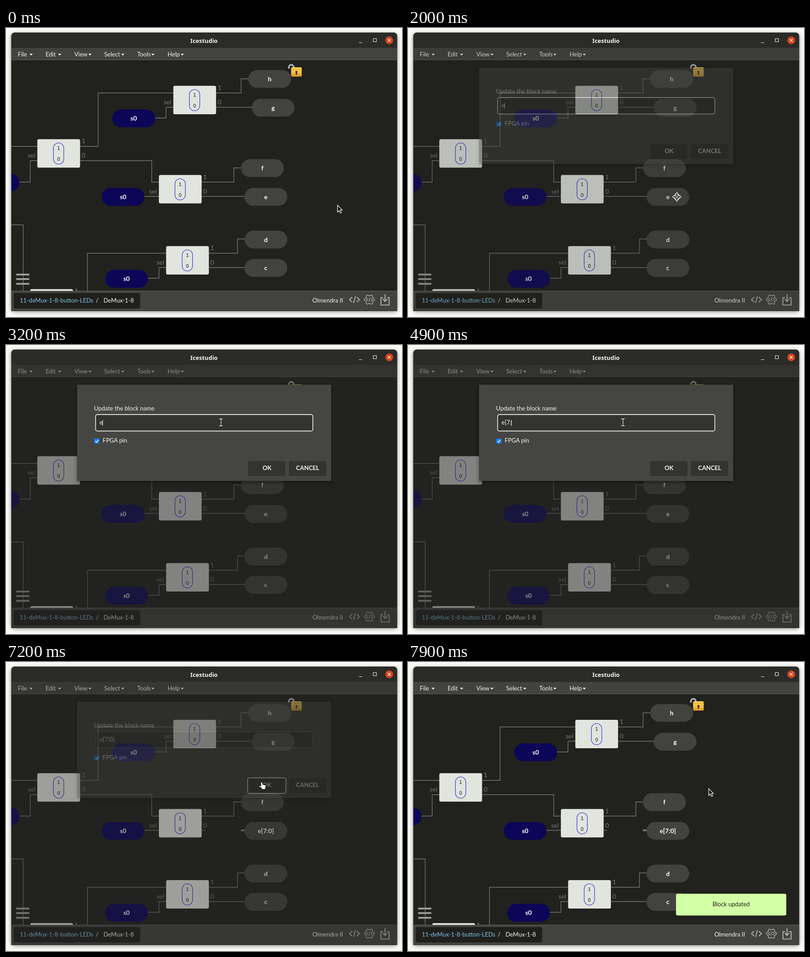
These frames come from a looping animation (875x640 px, 8000 ms). An HTML page:

```html
<!DOCTYPE html>
<html lang="en">
<head>
<meta charset="utf-8">
<title>Icestudio block rename</title>
<style>
  html, body { margin: 0; width: 100%; height: 100%; overflow: hidden; background: #fafaf7; }
  svg { display: block; width: 875px; height: 640px; }
  text { font: 13.1px Lato, sans-serif; fill: #f4f4f0; white-space: pre; }
  .bold { font-weight: bold; }
  .mid { text-anchor: middle; }
  .pill { font-size: 14px; font-weight: bold; text-anchor: middle; fill: #fff; }
  .port { font-size: 14px; fill: #7a7a76; }
  .mux { font: 11px "Liberation Sans", Arial, sans-serif; fill: #111; text-anchor: middle; }
  .wire { fill: none; stroke: #767672; stroke-width: 1.4; }
  .icon { fill: none; stroke: #aeaea9; stroke-width: 2; }
</style>
</head>
<body>
<svg viewBox="0 0 875 640">
  <defs>
    <filter id="shadow" x="-10%" y="-10%" width="120%" height="120%"><feGaussianBlur stdDeviation="4"/></filter>
    <clipPath id="canvasClip"><rect x="12" y="71" width="852" height="511"/></clipPath>
    <clipPath id="windowClip"><rect x="12" y="44" width="852" height="582.5"/></clipPath>
    <linearGradient id="gold" x2="0" y2="1"><stop stop-color="#ffd95a"/><stop offset="1" stop-color="#e9a52c"/></linearGradient>
  </defs>

  <rect x="11" y="12" width="854" height="617" rx="8" fill="#555" opacity=".6" filter="url(#shadow)"/>
  <path d="M11.5 627V18a8 8 0 0 1 8-8H856.500a8 8 0 0 1 8 8V627Z" fill="#2b2b28"/>
  <text class="bold mid" x="437.500" y="32.500" style="font-family:'Noto Sans',sans-serif;font-size:13px">Icestudio</text>
  <path d="M780 32.500h7M811.500 23.500h7v7h-7z" fill="none" stroke="#f2f2ee" stroke-width="1.100"/>
  <circle cx="846.800" cy="27.200" r="8.700" fill="#d2421a"/>
  <path d="M843.500 24l6.500 6.500m0-6.500l-6.500 6.500" stroke="#fff" stroke-width="1.300"/>

  <rect x="12" y="44" width="852" height="27" fill="#42423f"/>
  <rect x="12" y="71" width="852" height="511" fill="#21211d"/>
  <path d="M12 70.500H864" stroke="#62625e"/>
  <g id="menu"></g>

  <g clip-path="url(#canvasClip)">
    <g id="diagram"></g>
    <path id="wireOpen" class="wire" d="M432 372.800H527"/>
    <g id="wireCut"><path class="wire" d="M432 372.800h8"/><path d="M519 372.800h8" stroke="#767672" stroke-width="4"/></g>
    <g id="pills"></g>
    <rect id="selection" x="527" y="341.500" width="95.500" height="62.500" fill="#78aadc" opacity=".25"/>
    <path d="M625 90v-3a5.500 5.500 0 0 1 11 0v5" fill="none" stroke="#b3b8bb" stroke-width="3.400"/>
    <rect x="630" y="87" width="23.500" height="20.500" rx="2.500" fill="url(#gold)"/>
    <path d="M630 91h23.500M630 104h23.500" stroke="#c98a22"/>
    <path d="M641.700 95a2.300 2.300 0 0 1 1.200 4.300l.7 4h-3.800l.7-4a2.300 2.300 0 0 1 1.200-4.300" fill="#3d2c12"/>
    <path d="M22.500 546h29M22.500 556h29M22.500 566.500h29" stroke="#9c9c98" stroke-width="4.200"/>
  </g>

  <rect x="12" y="582" width="852" height="44.500" fill="#42423f"/>
  <path d="M12 582.500H864" stroke="#686864"/>
  <rect x="17" y="587" width="279.500" height="34" rx="4" fill="#1f1f1c"/>
  <text x="30.500" y="608" style="fill:#83c5e6">11-deMux-1-8-button-LEDs</text>
  <text x="198.500" y="608">/</text>
  <text x="215.500" y="608">DeMux-1-8</text>
  <text x="677" y="608">Olmendra II</text>
  <path class="icon" d="M765 596l-6 5.500 6 5.500M775 596l6 5.500-6 5.500M772 594l-4 15"/>
  <path class="icon" id="gear" style="stroke-width:1.500"/>
  <path class="icon" style="stroke-width:1.300" d="M800 598l-3.500 3.500 3.500 3.500M806 598l3.500 3.500-3.500 3.500M804 597l-2 9"/>
  <path class="icon" d="M833 597h-4.500v16.500h18V597H842M837.500 589.500v15M832.500 600l5 5.500 5-5.500" style="stroke-width:2.200"/>

  <rect id="dimmer" x="12" y="44" width="852" height="582.500" fill="#252525"/>

  <g id="dialog">
    <rect x="157" y="91" width="561" height="213" fill="#000" opacity=".45" filter="url(#shadow)"/>
    <rect x="157" y="88" width="561.500" height="213" fill="#454541"/>
    <text x="194.500" y="145">Update the block name</text>
    <rect id="field" fill="#333330"/>
    <text id="typed" x="206.800" y="176"></text>
    <rect id="caret" y="166" width="1" height="13" fill="#fff"/>
    <rect x="195" y="207" width="11.500" height="11.500" rx="2" fill="#1579f2"/>
    <path d="M197.500 212.800l2.500 2.700 4.300-5.500" fill="none" stroke="#fff" stroke-width="1.700"/>
    <text x="213.500" y="216">FPGA pin</text>
    <rect id="ok" x="535" y="257" width="82.500" height="33" rx="3" fill="#333330"/>
    <rect id="okRing" x="534" y="256.500" width="84.500" height="34.500" rx="4" fill="none" stroke="#e6e6e2" stroke-width="2"/>
    <rect x="625" y="257" width="82.500" height="33" rx="3" fill="#333330"/>
    <text class="bold mid" x="576.800" y="276.500">OK</text>
    <text class="bold mid" x="666.500" y="276.500">CANCEL</text>
  </g>

  <g clip-path="url(#windowClip)">
    <g id="toast">
      <rect x="592.500" y="513.500" width="243" height="47.500" rx="3" fill="#d3ffa6" stroke="#b5df8b"/>
      <text class="mid" x="714" y="541" style="fill:#20201c">Block updated</text>
    </g>
  </g>

  <g id="cursor">
    <path id="arrow" d="M.5.5V15.500L4 12.200l2.600 5.600 2.600-1.200-2.600-5.400H11Z" fill="#111" stroke="#fff" stroke-width="1.200"/>
    <g id="move" fill="#111" stroke="#fff" stroke-width="1.200">
      <path d="M0-9.500L3.500-5.500H1.500L5.500-1.500V-3.500L9.500 0 5.500 3.500V1.500L1.500 5.500H3.500L0 9.500-3.500 5.500H-1.500L-5.500 1.500V3.500L-9.500 0-5.500-3.500V-1.500L-1.500-5.500H-3.500Z"/>
      <circle r="2.200"/>
    </g>
    <g id="beam" fill="none">
      <path d="M-4-7.500h3L0-6.500 1-7.500h3M-4 8h3L0 7 1 8h3M0-6.500V7" stroke="#111" stroke-width="3"/>
      <path d="M-4-7.500h3L0-6.500 1-7.500h3M-4 8h3L0 7 1 8h3M0-6.500V7" stroke="#fff" stroke-width="1.300"/>
    </g>
    <path id="hand" d="M0 .5c1.200-.8 2.300 0 2.500 1.200L3 5.500l5.500 1c1.300.3 1.700 1.200 1.500 2.500L9 13v3H1.500v-2L-4.500 9.500c-.8-1.200.4-2.200 1.600-1.600L-.6 9-1 2C-1 1.200-.6.700 0 .5Z" fill="#fff" stroke="#111" stroke-width=".9"/>
  </g>
</svg>

<script>
const LOOP = 8000, STEP = 100;
const $ = id => document.getElementById(id);
const clamp = v => Math.max(0, Math.min(1, v));
const set = (id, attrs) => { for (const k in attrs) $(id).setAttribute(k, attrs[k]); };
const show = (id, on) => set(id, { visibility: on ? 'visible' : 'hidden' });

const menu = [['File', 26, 52], ['Edit', 87.5, 115], ['View', 151, 182], ['Select', 217, 254.500], ['Tools', 290, 321], ['Help', 357, 386]];
$('menu').innerHTML = menu.map(([name, x, caret]) =>
  `<text x="${x}" y="62.500">${name}</text><path d="M${caret} 57h7l-3.500 4z" fill="#f4f4f0"/>`).join('');

const wires = ['M464 143.700H519.500V112.500H536', 'M464 175.500H543', 'M329 199.200H353.500V175.500H370',
  'M164 262.200H203.500V143.700H370', 'M12 262.200H70', 'M29 341.200H53.500V293.700H70',
  'M164 293.700H322V341.200H338', 'M432 341.200H503.500V309.700H520', 'M306 372.800H338',
  'M180 582V498.700H354', 'M448 498.700H511.500V467.300H527', 'M448 530.500H527',
  'M313 554.200H338V530.500H354', 'M12 436H38V582'];

const mux = ([x, y]) => `
  <rect x="${x}" y="${y}" width="94.500" height="63" rx="3.500" fill="#e2e4de"/>
  <rect x="${x + 35.5}" y="${y + 8.3}" width="23" height="47" rx="11.500" fill="none" stroke="#2a20cc" stroke-width="1.100"/>
  <text class="mux" x="${x + 47}" y="${y + 24}">1</text><text class="mux" x="${x + 47}" y="${y + 48}">0</text>
  <text class="port" x="${x + 98}" y="${y + 9}">1</text><text class="port" x="${x + 98}" y="${y + 41}">0</text>
  <text class="port" x="${x - 4.5}" y="${y + 41}" text-anchor="end">sel</text>`;

const pill = ([label, x, y]) => `
  <rect x="${x - 47.3}" y="${y - 19.8}" width="94.600" height="39.600" rx="19.800" fill="${label === 's0' ? '#0c0658' : '#42423f'}"/>
  <text class="pill" x="${x}" y="${y + 5}">${label}</text>`;

$('diagram').innerHTML = `<path class="wire" d="${wires.join('')}"/>` +
  [[369.7, 128], [69.2, 246.2], [337.8, 325.5], [353.8, 483], [53.5, 578.2]].map(mux).join('');
$('pills').innerHTML = [['h', 582.7, 112.8], ['g', 590.2, 176.5], ['f', 566.6, 310.3], ['d', 574.2, 468.5],
  ['c', 574.2, 531.2], ['s0', 282.2, 200], ['s0', 258.8, 374], ['s0', 266.3, 555.4], ['s0', -17.5, 342.3],
  ['e', 574.2, 374]].map(pill).join('');
const blockName = $('pills').lastElementChild;

const gear = Array.from({ length: 96 }, (_, i) => {
  const a = i / 96 * 2 * Math.PI, r = 9.7 + 1.2 * Math.tanh(3 * Math.cos(6 * a));
  return `${(803 + r * Math.cos(a)).toFixed(1)} ${(601.5 + r * Math.sin(a)).toFixed(1)}`;
});
set('gear', { d: `M${gear.join('L')}Z` });

// Pointer path: time, x, y
const path = [[0, 732, 392], [300, 732, 392], [400, 677, 378], [500, 677, 378], [800, 594, 374],
  [2200, 594, 374], [2700, 475, 171], [5900, 475, 171], [6000, 477, 171], [6100, 477, 171],
  [6200, 509, 222], [6400, 509, 222], [6700, 564, 266], [7300, 564, 266], [7900, 664, 280], [8000, 664, 280]];
const keys = [[4000, '['], [4400, '7'], [4900, ':'], [5000, '0'], [5300, ']']];

function pointerAt(t) {
  const i = path.findIndex(p => p[0] > t);
  const [t0, x0, y0] = path[i - 1], [t1, x1, y1] = path[i];
  const k = (t - t0) / (t1 - t0);
  return [x0 + (x1 - x0) * k, y0 + (y1 - y0) * k];
}

function pointerShape(t, x, y) {
  if (t >= 700 && t <= 2200) return 'move';
  if (t < 2200 || t > 7300) return 'arrow';
  if (x > 197 && x < 679 && y > 153 && y < 191) return 'beam';
  return x > 535 && x < 618 && y > 257 && y < 290 ? 'hand' : 'arrow';
}

function easeOutBack(k) {
  const s = 1.4, u = k - 1;
  return 1 + (s + 1) * u ** 3 + s * u ** 2;
}

function render(t) {
  const fadeIn = clamp((t - 1900) / 250);
  set('dimmer', { opacity: 0.5 * fadeIn * (1 - clamp((t - 7130) / 250)) });
  set('dialog', { opacity: fadeIn * (1 - clamp((t - 7130) / 108)) });
  show('selection', t >= 1200 && t < 2000);

  const renamed = t >= 7200;
  blockName.textContent = renamed ? 'e[7:0]' : 'e';
  show('wireOpen', !renamed);
  show('wireCut', renamed);

  const okFocused = t >= 6900;
  show('okRing', okFocused);
  set('field', okFocused
    ? { x: 198.5, y: 154.5, width: 478.5, height: 35, rx: 3, stroke: '#6e6e6a', 'stroke-width': 1 }
    : { x: 198, y: 154, width: 480, height: 36.5, rx: 4, stroke: '#dededa', 'stroke-width': 1.8 });
  $('typed').textContent = 'e' + keys.filter(k => t >= k[0]).map(k => k[1]).join('');
  set('caret', { x: Math.floor(206.8 + $('typed').getComputedTextLength()) });
  show('caret', t < 5900 && !(t >= 2600 && t < 3200));

  const slide = clamp((t - 7150) / 500);
  set('toast', { transform: `translate(${610 * (1 - easeOutBack(slide))} 0)`, opacity: clamp(slide * 2) });

  const [x, y] = pointerAt(t), shape = pointerShape(t, x, y);
  set('cursor', { transform: `translate(${x} ${y})` });
  for (const id of ['arrow', 'move', 'beam', 'hand']) show(id, id === shape);
}

const start = performance.now();
function tick() {
  const t = (performance.now() - start) % LOOP;
  render(Math.floor(t / STEP) * STEP);
  requestAnimationFrame(tick);
}
tick();
</script>
</body>
</html>
```
